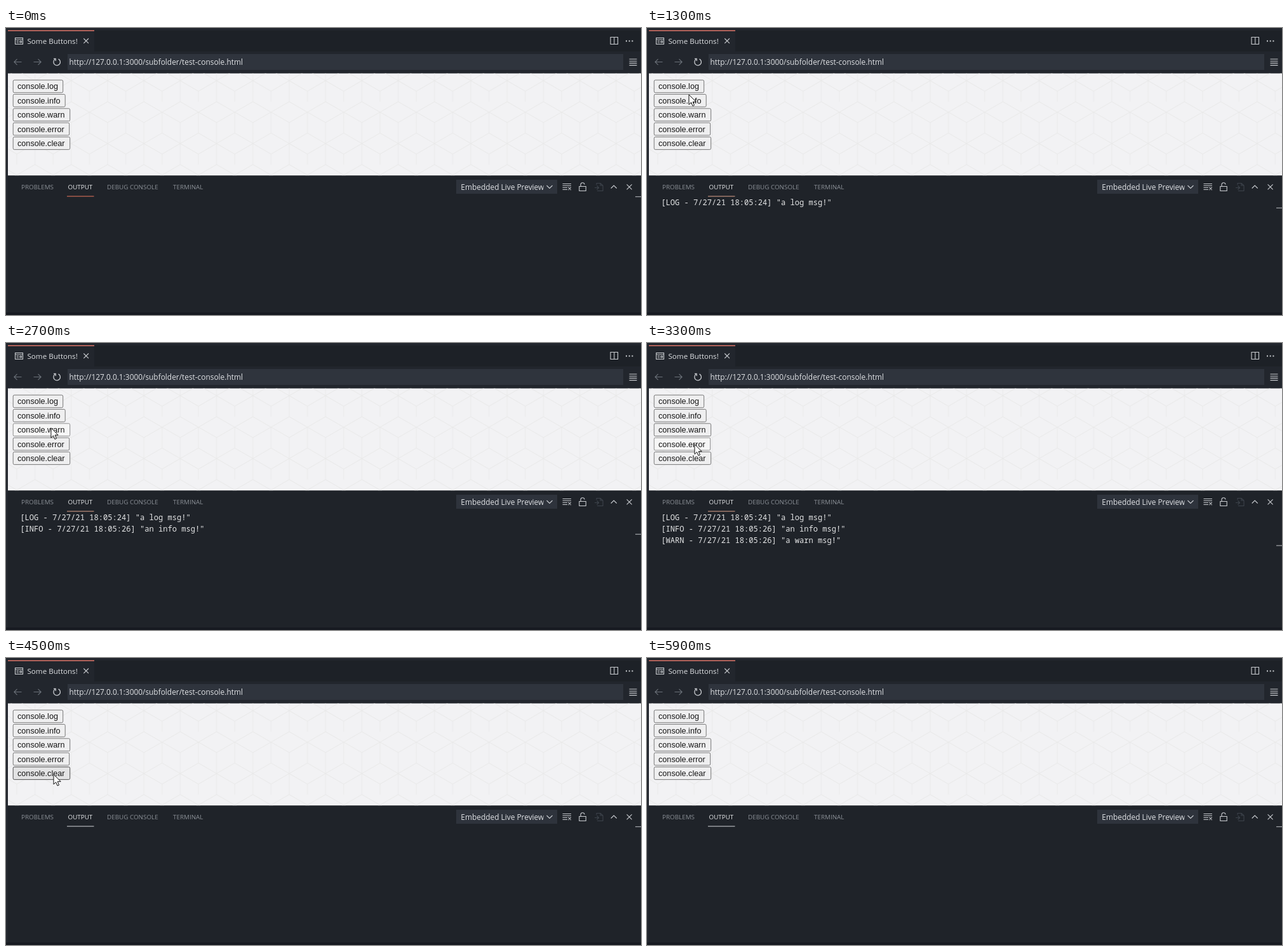
Write an HTML page that moves like this. It is 1000 px wide and 452 px high and loops after 6 s.

```html
<!DOCTYPE html>
<html lang="en">
<head>
<meta charset="utf-8">
<title>Console buttons</title>
<style>
  html, body { margin: 0; width: 100%; height: 100%; overflow: hidden; background: #1f2329; }
  svg { display: block; width: 1000px; height: 452px; }
  text { white-space: pre; }
  .ui { font: 11.9px "Open Sans", "Noto Sans", sans-serif; fill: #dfe1e4; }
  .tab { font-size: 9.85px; fill: #8b9097; }
  .active { fill: #e8eaec; }
  .button { font: 12.65px "Liberation Sans", Arial, sans-serif; fill: #151515; }
  .log { font: 500 12.1px "Noto Sans Mono", "DejaVu Sans Mono", monospace; fill: #e4e5e6; }
  .icon { fill: none; stroke: #c9ccd0; stroke-width: 1.1; }
  .dim { stroke: #6a7078; }
  .off { stroke: #3d434b; }
</style>
</head>
<body>
<svg viewBox="0 0 1000 452">
  <defs>
    <pattern id="cubes" width="57.2" height="99" x="131.4" y="116" patternUnits="userSpaceOnUse">
      <path fill="none" stroke="#e9e9e9" d="M0 16.5 28.6 0 57.2 16.5 28.6 33ZM28.6 33V66M0 16.5V49.5M57.2 16.5V49.5M0 49.5 28.6 66 57.2 49.5M0 82.5 28.6 66 57.2 82.5M0 82.5V99M57.2 82.5V99M0 49.5V49.5M28.6 66V99M0 82.5 28.6 99 57.2 82.5" style="display:none"/>
      <path fill="none" stroke="#e9e9e9" d="M0 16.5 28.6 0 57.2 16.5 28.6 33ZM28.6 33V66M0 16.5V49.5M57.2 16.5V49.5M0 49.5 28.6 66 57.2 49.5M28.6 66 0 82.5M28.6 66 57.2 82.5M0 82.5V99M57.2 82.5V99M28.6 66V99"/>
    </pattern>
    <clipPath id="selectClip"><path d="M709 239H846.5V261H709Z"/></clipPath>
  </defs>

  <rect width="1000" height="452" fill="#22262d"/>
  <rect x="139" y="4" width="861" height="33" fill="#1d2127"/>
  <rect x="3" y="3.5" width="136" height="1.5" fill="#dc7468"/>
  <text class="ui" x="33.5" y="24.5" style="font-size:11.6px">Some Buttons!</text>
  <g class="icon">
    <path d="M14.5 15.5H26.5V25.5H14.5ZM14.5 18H26.5M16.5 20.5H20M16.5 23H20M22 20.5H24.5V23H22Z"/>
    <path d="M122.3 16.5 130 24.2M130 16.5 122.3 24.2"/>
    <path d="M952 14.5H963.5V25.5H952ZM957.8 14.5V25.5"/>
    <path d="M976 20.5h2M980.7 20.5h2M985.4 20.5h2" stroke-width="2"/>
  </g>

  <rect x="97" y="41" width="875" height="25" fill="#2f343d"/>
  <text class="ui" x="99.5" y="58">http://127.0.0.1:3000/subfolder/test-console.html</text>
  <g class="icon">
    <path class="dim" d="M24.5 53.5H13M17.5 48.8 12.8 53.5 17.5 58.2M43.5 53.5H55M50.5 48.8 55.2 53.5 50.5 58.2"/>
    <path d="M77 49.3A5.3 5.3 0 1 0 82.5 48.8M75 48.3H78.2V52" stroke-width="1.3"/>
    <path d="M981.5 49H993.5M981.5 52.2H993.5M981.5 55.4H993.5M981.5 58.6H993.5"/>
  </g>

  <rect x="3" y="71.5" width="997" height="161" fill="#f2f2f4"/>
  <rect x="3" y="71.5" width="997" height="161" fill="url(#cubes)"/>
  <g id="buttons"></g>

  <rect x="3" y="232.5" width="997" height="215.5" fill="#1f2329"/>
  <rect y="448" width="1000" height="4" fill="#171a21"/>
  <g class="ui">
    <text class="tab" x="24" y="253.7">PROBLEMS</text>
    <text class="tab active" x="97.5" y="253.7">OUTPUT</text>
    <text class="tab" x="159" y="253.7">DEBUG CONSOLE</text>
    <text class="tab" x="263" y="253.7">TERMINAL</text>
  </g>
  <rect id="underline" x="96" y="264.5" width="42.5" height="1.1"/>
  <rect x="709" y="239" width="159" height="22" fill="#2e333c"/>
  <text class="ui" x="716.3" y="254.7" clip-path="url(#selectClip)">Embedded Live Preview</text>
  <g class="icon">
    <path d="M851.5 248 856 252.5 860.5 248"/>
    <path d="M876.5 245.5H890M876.5 248.5H890M876.5 251.5H884M876.5 254.5H884M885.5 251 889.7 255.2M889.7 251 885.5 255.2"/>
    <path d="M902.8 249.5H913.2V256.5H902.8ZM905 249.5V247A3 3 0 0 1 911 246.5"/>
    <path class="off" d="M930 247V244.5H936L940 248V256.5H931M936 244.5V248H940M927 251.5H933M930.5 248.5 933.5 251.5 930.5 254.5"/>
    <path d="M952.7 252.5 957.2 248 961.7 252.5M977.6 246.3 985.6 254.3M985.6 246.3 977.6 254.3"/>
  </g>
  <g id="messages"></g>
  <rect id="marker" x="991" width="9" height="1.3" fill="#9a9da1"/>
  <path id="cursor" d="M0 0V15.6L3.6 12.2 6 17.8 8.5 16.7 6.2 11.3H11.2Z" fill="#fff" stroke="#111" stroke-width="1"/>
</svg>
<script>
  const LOOP = 6000, STEP = 100, CLEAR_AT = 4400;

  // Hover and press spans are [start, end] in ms.
  const buttons = [
    { label: "log", width: 79, hover: [400, 1200], press: [700, 800] },
    { label: "info", width: 82.5, hover: [1400, 1900], press: [1500, 1600] },
    { label: "warn", width: 90, hover: [2000, 3100], press: [2700, 2900] },
    { label: "error", width: 89, hover: [3200, 3900], press: [3300, 3500] },
    { label: "clear", width: 90, hover: [4000, 4700], press: [4200, 4400] }
  ];
  const messages = [
    { at: 800, text: '[LOG - 7/27/21 18:05:24] "a log msg!"' },
    { at: 1600, text: '[INFO - 7/27/21 18:05:26] "an info msg!"' },
    { at: 2900, text: '[WARN - 7/27/21 18:05:26] "a warn msg!"' },
    { at: 3500, text: '[ERROR - 7/27/21 18:05:27] "an error msg!"' }
  ];
  // Cursor tip: time, x, y
  const path = [
    [100, 185, 165], [500, 72, 91], [600, 70, 88.5], [1000, 70, 89], [1300, 66, 105],
    [1500, 68, 111], [1800, 69, 113], [2100, 70.5, 132], [2900, 71, 134],
    [3300, 75, 159.5], [3700, 75, 160], [4100, 75, 182], [4600, 75, 183.5], [4900, 210, 243]
  ];

  const byId = id => document.getElementById(id);
  const within = (t, [start, end]) => t >= start && t < end;

  function add(parent, tag, attributes, content = "") {
    const node = document.createElementNS("http://www.w3.org/2000/svg", tag);
    for (const [key, value] of Object.entries(attributes)) node.setAttribute(key, value);
    node.textContent = content;
    return parent.appendChild(node);
  }

  buttons.forEach((button, i) => {
    const y = 82 + i * 22.4;
    button.box = add(byId("buttons"), "rect", { x: 11.2, y, width: button.width - 0.5, height: 19.8, rx: 2 });
    add(byId("buttons"), "text", { class: "button", x: 18, y: y + 14.4 }, "console." + button.label);
  });
  messages.forEach((message, i) => {
    message.node = add(byId("messages"), "text", { class: "log", x: 22.3, y: 278.5 + i * 18 }, message.text);
  });

  function cursorAt(t) {
    const next = path.findIndex(point => point[0] > t);
    if (next < 1) return null;
    const [t0, x0, y0] = path[next - 1], [t1, x1, y1] = path[next];
    const p = (t - t0) / (t1 - t0), ease = p * p * (3 - 2 * p);
    return [x0 + (x1 - x0) * ease, y0 + (y1 - y0) * ease];
  }

  function render(time) {
    const t = Math.floor((time % LOOP) / STEP) * STEP;

    for (const { box, hover, press } of buttons) {
      const [fill, stroke] = within(t, press) ? ["#f6f6f6", "#8d8d8d"]
        : within(t, hover) ? ["#e3e3e4", "#505050"] : ["#efeff0", "#777"];
      box.setAttribute("fill", fill);
      box.setAttribute("stroke", stroke);
    }

    let lines = 0;
    for (const { node, at } of messages) {
      const shown = within(t, [at, CLEAR_AT]);
      node.style.display = shown ? "" : "none";
      lines += shown;
    }
    byId("marker").setAttribute("y", 265 + lines * 17.8);
    byId("underline").setAttribute("fill", t < 800 ? "#d9705a" : t < CLEAR_AT ? "#cf9a85" : "#c3c6ca");

    const tip = cursorAt(t);
    byId("cursor").style.display = tip ? "" : "none";
    if (tip) byId("cursor").setAttribute("transform", `translate(${tip})`);
  }

  const start = performance.now();
  function tick() {
    render(performance.now() - start);
    requestAnimationFrame(tick);
  }
  tick();
</script>
</body>
</html>
```
